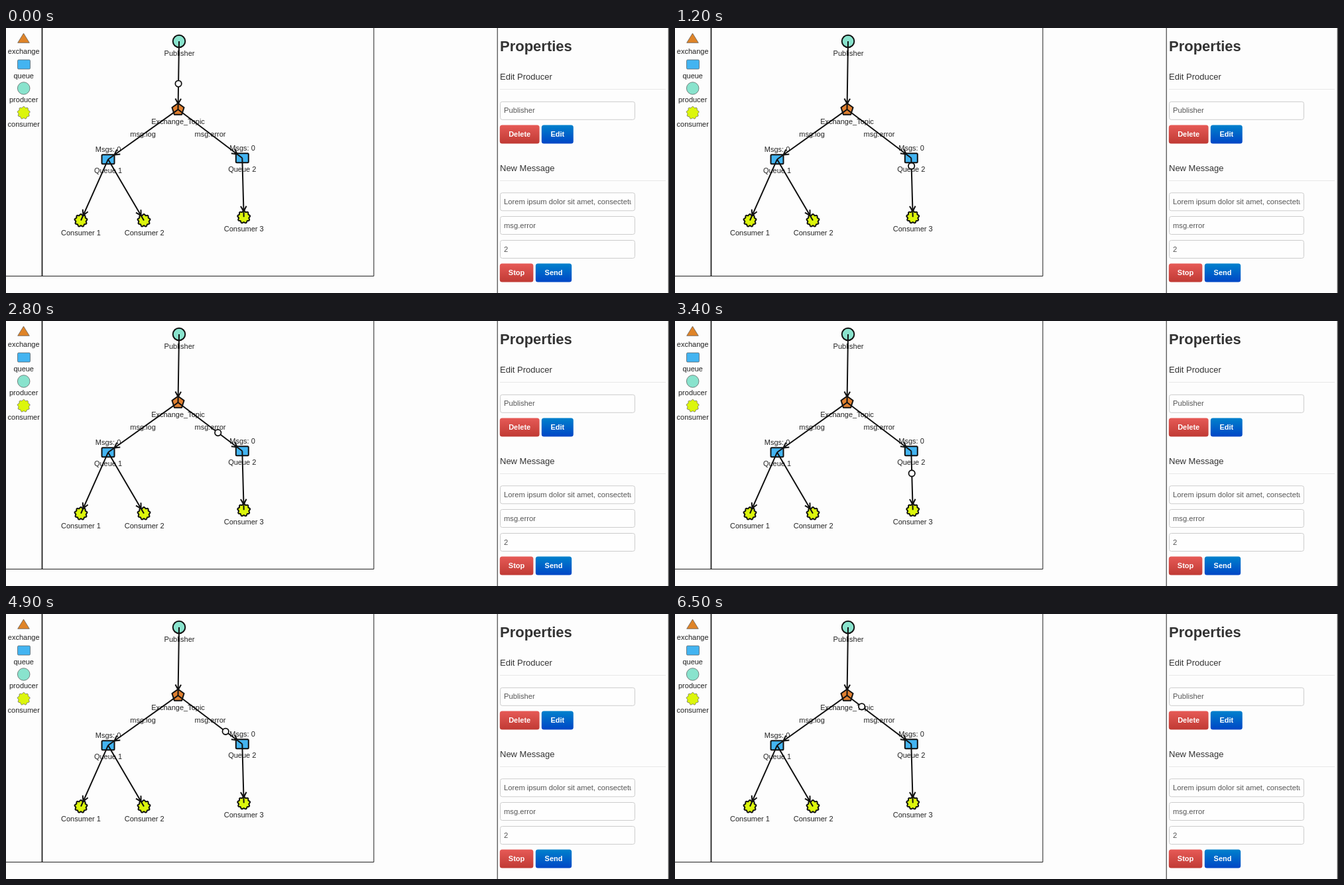
An HTML page for the animation above (6.6 s loop, 1000x400 px).

```html
<!DOCTYPE html>
<html lang="en">
<head>
<meta charset="utf-8">
<title>Message routing</title>
<style>
  html, body { margin: 0; height: 100%; overflow: hidden; background: #fdfdfd; }
  svg { display: block; width: 100vw; height: 100vh; }
  text { font: 11px "Liberation Sans", Arial, sans-serif; fill: #222; }
  .title { font-size: 22px; font-weight: bold; fill: #333; }
  .heading { font-size: 13px; fill: #333; }
  .value { font-size: 11.2px; fill: #555; }
  .button { font-weight: bold; fill: #fff; }
  .node { stroke: #111; stroke-width: 2; stroke-linejoin: round; }
  .legend { stroke: #555; stroke-width: .7; }
  .link { stroke: #111; stroke-width: 2; fill: none; }
  .frame { stroke: #222; fill: none; }
  .rule { stroke: #e8e8e8; }
  .field { stroke: #ccc; fill: #fefefe; }
</style>
</head>
<body>
<svg id="stage" viewBox="0 0 1000 400" preserveAspectRatio="none">
  <defs>
    <linearGradient id="red" x2="0" y2="1"><stop stop-color="#e65a56"/><stop offset="1" stop-color="#c03a34"/></linearGradient>
    <linearGradient id="blue" x2="0" y2="1"><stop stop-color="#0081cc"/><stop offset="1" stop-color="#0046c6"/></linearGradient>
    <clipPath id="fieldClip"><rect x="746" y="100" width="197" height="260"/></clipPath>
  </defs>
</svg>
<script>
const LOOP = 6600, STEP = 100;
const LEG = 794, PERIOD = 2006, FIRST_SENT = -494;

const stage = document.getElementById('stage');

function add(tag, attrs, content = '') {
  const el = document.createElementNS(stage.namespaceURI, tag);
  for (const key in attrs) el.setAttribute(key, attrs[key]);
  el.textContent = content;
  return stage.appendChild(el);
}

const path = (d, cls, fill = 'none') => add('path', { d, class: cls, fill });
const label = (content, x, y) => add('text', { x, y, 'text-anchor': 'middle' }, content);
const write = (content, x, y, cls) => add('text', { x, y, class: cls }, content);

// Closed polygon whose radius may depend on the angle, starting at the top
function ring(x, y, count, radius) {
  const points = Array.from({ length: count }, (_, i) => {
    const a = i / count * 2 * Math.PI, r = radius(a);
    return (x + r * Math.sin(a)).toFixed(2) + ' ' + (y - r * Math.cos(a)).toFixed(2);
  });
  return 'M' + points.join('L') + 'Z';
}

const shapes = {
  producer: (x, y, cls) => add('circle', { cx: x, cy: y, r: 9.3, class: cls, fill: '#89e3cd' }),
  queue: (x, y, cls) => add('rect', { x: x - 9.5, y: y - 7, width: 19, height: 14, rx: 1.5, class: cls, fill: '#43b4f1' }),
  consumer: (x, y, cls) => path(ring(x, y, 72, a => 8.7 + .9 * Math.cos(9 * a)), cls, '#dcf60c'),
  exchange: (x, y, cls) => path(ring(x, y, 5, () => 9.5), cls, '#e08030')
};

function arrow([x1, y1], [x2, y2], gap) {
  const a = Math.atan2(y2 - y1, x2 - x1);
  const tx = x2 - gap * Math.cos(a), ty = y2 - gap * Math.sin(a);
  const barb = turn => `${tx - 9 * Math.cos(a + turn)} ${ty - 9 * Math.sin(a + turn)}`;
  path(`M${x1} ${y1}L${x2} ${y2}M${barb(.5)}L${tx} ${ty}L${barb(-.5)}`, 'link');
}

// Canvas frame and palette
path('M0 374.5H554.8V0', 'frame');
add('path', { d: 'M54.5 0V374', class: 'frame', 'stroke-width': 1.8 });
path('M26.5 8L35.3 22.3H17.7Z', 'legend', '#df8428');
shapes.queue(27, 55, 'legend');
shapes.producer(26.7, 91, 'legend');
shapes.consumer(26.7, 128, 'legend');
['exchange', 'queue', 'producer', 'consumer'].forEach((name, i) => label(name, 26.7, 39 + 36.7 * i));

// Network
const publisher = [261, 20], exchange = [259.5, 123];
const queue1 = [154, 198.3], queue2 = [356.3, 196.3];
const consumer1 = [113, 290.5], consumer2 = [208, 290.5], consumer3 = [358.7, 285.3];

shapes.producer(...publisher, 'node');
shapes.exchange(...exchange, 'node');
for (const q of [queue1, queue2]) shapes.queue(...q, 'node');
for (const c of [consumer1, consumer2, consumer3]) shapes.consumer(...c, 'node');

label('Publisher', 261.5, 42);
label('Exchange_Topic', 259.5, 145);
label('msg.log', 206.5, 164);
label('msg.error', 308, 163.5);
label('Msgs: 0', 154, 187);
label('Msgs: 0', 356.5, 185);
label('Queue 1', 154, 219.3);
label('Queue 2', 356.3, 217.3);
label('Consumer 1', 113, 313);
label('Consumer 2', 208.7, 313);
label('Consumer 3', 358.7, 307);

arrow(publisher, exchange, 8.5);
arrow(exchange, queue1, 11.5);
arrow(exchange, queue2, 9.5);
for (const [from, to] of [[queue1, consumer1], [queue1, consumer2], [queue2, consumer3]]) arrow(from, to, 8.5);

// Properties panel
path('M741.2 0V400M999.3 0V400', 'frame');
path('M745 92.5H995M745 230.5H995', 'rule');
write('Properties', 745, 35, 'title');
write('Edit Producer', 745, 77.7, 'heading');
write('New Message', 745, 215.7, 'heading');

function field(content, y) {
  add('rect', { x: 745.5, y, width: 203, height: 27, rx: 3, class: 'field' });
  write(content, 751, y + 17, 'value').setAttribute('clip-path', 'url(#fieldClip)');
}
field('Publisher', 111.3);
field('Lorem ipsum dolor sit amet, consectetur', 248.8);
field('msg.error', 284.5);
field('2', 320.5);

function button(content, x, y, width, color) {
  add('rect', { x, y, width, height: 28, rx: 3.5, fill: `url(#${color})` });
  label(content, x + width / 2, y + 17.7).setAttribute('class', 'button');
}
button('Delete', 744.8, 146.4, 59.8, 'red');
button('Edit', 807.8, 146.4, 48, 'blue');
button('Stop', 744.8, 355.6, 50.6, 'red');
button('Send', 798.8, 355.6, 54.4, 'blue');

// Messages travel publisher -> exchange -> queue 2 -> consumer 3
const route = [publisher, exchange, queue2, consumer3];
const messages = Array.from({ length: 5 }, (_, i) => ({
  sent: FIRST_SENT + PERIOD * (i - 1),
  dot: add('circle', { r: 4.7, fill: '#fff', stroke: '#111', 'stroke-width': 1.8 })
}));

function draw(now) {
  const time = Math.floor(now % LOOP / STEP) * STEP;
  for (const { sent, dot } of messages) {
    const progress = (time - sent) / LEG;
    const visible = progress >= 0 && progress < route.length - 1;
    dot.setAttribute('visibility', visible ? 'visible' : 'hidden');
    if (!visible) continue;
    const leg = Math.floor(progress), part = progress - leg;
    const [x, y] = route[leg].map((v, axis) => v + (route[leg + 1][axis] - v) * part);
    dot.setAttribute('cx', x);
    dot.setAttribute('cy', y);
  }
}

function tick() {
  draw(performance.now());
  requestAnimationFrame(tick);
}
tick();
</script>
</body>
</html>
```
